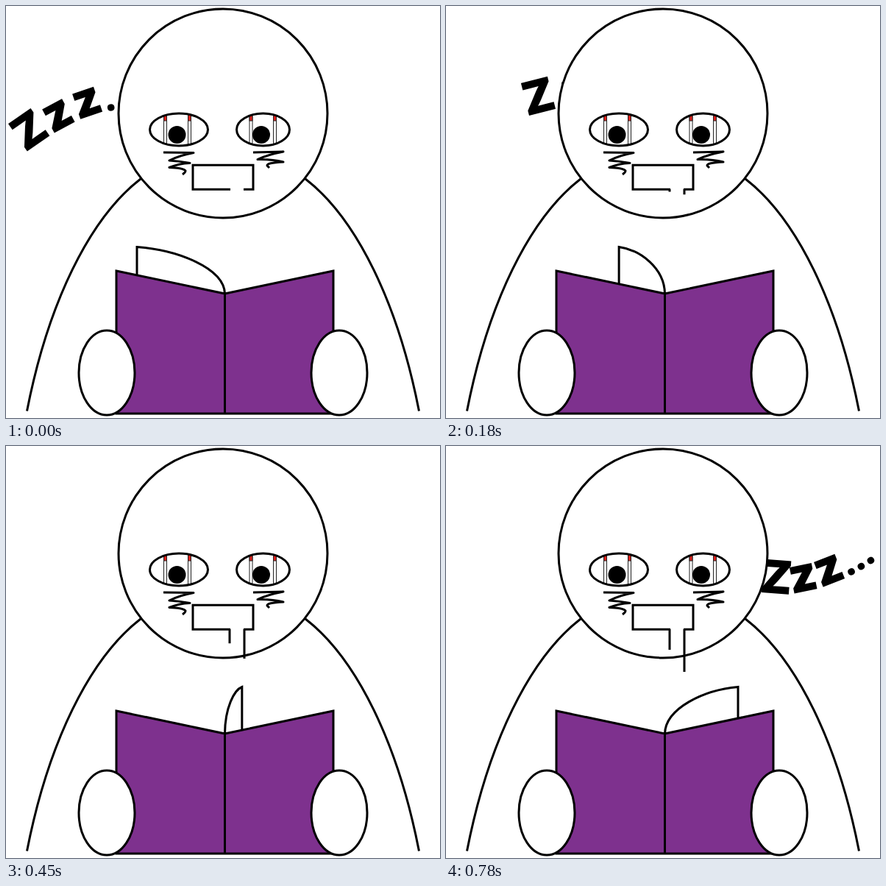
Animation of 590 by 560 pixels, one loop 1500 ms. Source, as an HTML page:

```html
<!DOCTYPE html>
<html lang="en">
<head>
<meta charset="utf-8">
<title>Sleepy reader</title>
<style>
  html, body { margin: 0; width: 100%; height: 100%; overflow: hidden; background: #fff; }
  svg { display: block; width: 590px; height: 560px; }
  .ink { fill: #fff; stroke: #000; stroke-width: 3; }
  .line { fill: none; stroke: #000; stroke-width: 3; }
  .cover { fill: #7e318e; stroke: #000; stroke-width: 3; }
  .vein rect { fill: #fff; stroke: #222; stroke-width: 1; }
  .vein rect + rect { fill: #e0201b; }
  .snore { text-anchor: middle; }
  .capital { font: 900 62.5px Inter, sans-serif; }
  .small { font: 900 66px Inter, sans-serif; }
  .dot { font: 700 56px "Open Sans", sans-serif; }
</style>
</head>
<body>
<svg viewBox="0 0 590 560">
  <defs>
    <clipPath id="leftEye"><ellipse cx="235" cy="168" rx="39.5" ry="22"/></clipPath>
    <clipPath id="rightEye"><ellipse cx="349.5" cy="168" rx="36" ry="22"/></clipPath>
    <g id="vein" class="vein">
      <rect x="-2" y="140" width="4" height="56"/>
      <rect x="-2" y="140" width="4" height="16"/>
    </g>
    <path id="track" d="M44 187C80 162 122 140.5 166 139.5C260 137 355 194 448 200.5C490 204 543.5 183 580 158.5L600 145"/>
  </defs>

  <path class="line" d="M28.5 550.5C57 405 113 289 183 235M561.5 550.5C533 405 477 289 407 235"/>
  <g id="snore" class="snore"></g>
  <circle class="ink" cx="295" cy="146" r="142"/>

  <g clip-path="url(#leftEye)">
    <use href="#vein" x="216.5"/><use href="#vein" x="249.5"/>
  </g>
  <g clip-path="url(#rightEye)">
    <use href="#vein" x="333"/><use href="#vein" x="365.5"/>
  </g>
  <circle cx="232.5" cy="175" r="12"/>
  <circle cx="347" cy="175" r="12"/>
  <ellipse class="line" cx="235" cy="168" rx="39.5" ry="22"/>
  <ellipse class="line" cx="349.5" cy="168" rx="36" ry="22"/>

  <path class="line" stroke-linejoin="round" d="M214 199L255 199.5Q236 203 222 210Q237 211 250 213.5Q235 214 222 219.5Q241 220 244 224Q244 226 240 229"/>
  <path class="line" stroke-linejoin="round" d="M336 199L377 198Q356 202 342 208.5Q362 208 377 212Q354 213 355 217L358 220"/>

  <path class="line" d="M305 249.3H254V216.3H336V249.3H323"/>
  <path id="drool" class="line"/>

  <path id="page" class="ink"/>
  <path class="cover" d="M150 360L297.5 391V554H150ZM445 360L297.5 391V554H445Z"/>
  <ellipse class="ink" cx="137" cy="498.5" rx="38" ry="57.5"/>
  <ellipse class="ink" cx="453" cy="498.5" rx="38" ry="57.5"/>
</svg>
<script>
const LOOP = 1500, STEP = 30;
const SNORE_STEPS = 26, SNORE_SPEED = 16.22;
const byId = id => document.getElementById(id);
const track = byId('track'), page = byId('page'), drool = byId('drool');
const clamp01 = v => Math.min(1, Math.max(0, v));

// Each glyph sits at a fixed distance ahead of the first letter.
const offsets = [0, 42, 82, 110, 125.5, 141];
const styles = { Z: 'capital', z: 'small', '.': 'dot' };
const glyphs = [...'Zzz...'].map((char, i) => {
  const node = document.createElementNS('http://www.w3.org/2000/svg', 'text');
  node.textContent = char;
  node.setAttribute('class', styles[char]);
  byId('snore').append(node);
  return { node, offset: offsets[i] };
});

function placeSnore(step) {
  const start = Math.min(step, SNORE_STEPS) * SNORE_SPEED;
  for (const { node, offset } of glyphs) {
    const s = start + offset;
    const p = track.getPointAtLength(s);
    const a = track.getPointAtLength(Math.max(0, s - 2));
    const b = track.getPointAtLength(s + 2);
    const angle = Math.atan2(b.y - a.y, b.x - a.x) * 180 / Math.PI;
    node.setAttribute('transform', `translate(${p.x} ${p.y}) rotate(${angle})`);
  }
}

function turnPage(step) {
  const x = 178 + 219 * clamp01(step / 23);
  const w = 297.5 - x;
  page.setAttribute('d',
    `M${x} 420V327.5C${x + 0.46 * w} 331.5 ${x + 0.99 * w} 356 297.5 391V420`);
}

function drip(step) {
  const p = clamp01((step - 4) / 16);
  drool.setAttribute('d', p ? `M304 249v${28 * p}M324 249v${58 * p}` : '');
}

function draw(time) {
  const step = Math.floor(time % LOOP / STEP);
  placeSnore(step);
  turnPage(step);
  drip(step);
}

const began = performance.now();
function tick(now) {
  draw(Math.max(0, now - began));
  requestAnimationFrame(tick);
}
draw(0);
requestAnimationFrame(tick);
</script>
</body>
</html>
```
